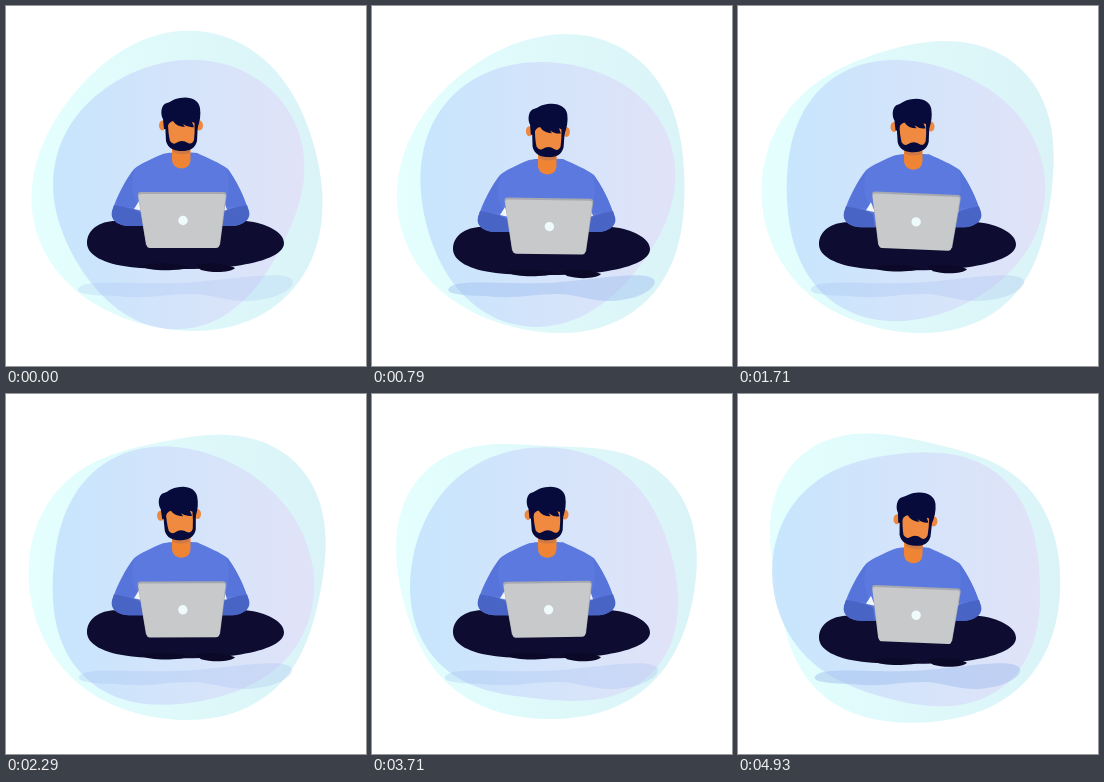
Animation, 360 px wide and 360 px high, one loop 5 s. Source, as an HTML page:

```html
<!DOCTYPE html>
<html lang="en">
<head>
<meta charset="utf-8">
<title>Working on a laptop</title>
<style>
html, body { margin: 0; width: 100%; height: 100%; overflow: hidden; background: #fff; }
svg { display: block; width: 100vw; height: 100vh; }
</style>
</head>
<body>
<svg viewBox="0 0 360 360">
  <defs>
    <linearGradient id="mint">
      <stop offset="0" stop-color="#e4fffe"/>
      <stop offset="1" stop-color="#daf3f7"/>
    </linearGradient>
    <linearGradient id="sky">
      <stop offset="0" stop-color="#c1e0fd"/>
      <stop offset="1" stop-color="#e2dff8"/>
    </linearGradient>
  </defs>
  <path id="outer" fill="url(#mint)"/>
  <path id="inner" fill="url(#sky)" opacity=".82"/>
  <path id="shadow" fill="#9dbbec" d="M72 283C76 274 110 277 140 277C185 279 220 272 250 270C275 268 288 270 287 277C284 287 262 295 238 295C215 294 205 288 185 288C160 288 150 292 122 291C100 289 70 290 72 283Z"/>

  <g id="body">
    <path fill="#0e0d31" d="M81 237C81 223 95 214 112 215H240C260 217 278 226 278 237C278 249 256 256 230 260C200 264 150 264 124 261C98 258 81 249 81 237Z"/>
    <path fill="#0b0927" d="M135 260C145 256 172 257 183 261C176 265 143 266 135 260ZM189 259C203 256 222 258 229 262C225 267 205 267 195 264Z"/>
    <path fill="#5b79de" d="M157 148C164 146 184 146 191 147C202 152 214 157 222 163C229 173 238 190 243 206C243 214 236 220 226 220H124C112 220 105 214 106 206C110 191 120 173 128 163C134 158 147 152 157 148Z"/>
    <path fill="#5674d9" d="M129 163C123 185 128 190 133 201H110C112 190 120 173 129 163ZM221 163C225 180 222 188 219 201H241C238 190 229 171 221 163Z"/>
    <path fill="#4864c5" d="M108 199C118 201 127 202 135 207L137 220H122C110 219 104 213 106 205ZM241 199C232 201 224 202 216 207L214 220H228C240 218 245 212 243 205Z"/>
    <path fill="#f1f5fc" d="M128 203L133 195L137 205ZM221 204L218 195L214 205Z"/>
    <path fill="#ee8434" d="M166 139H184.500V153C184.500 159 181 162.500 175.500 162.500S166 159 166 153Z"/>
    <g id="head">
      <path fill="#cf7a45" d="M167 142H184V147Q175 150 167 146Z"/>
      <ellipse cx="156.500" cy="119.500" rx="3.500" ry="5" fill="#ec8840"/>
      <ellipse cx="193.500" cy="119.500" rx="3.500" ry="5" fill="#ec8840"/>
      <path fill="#f08a40" d="M161 108H190V134Q187 142 176 142T161 134Z"/>
      <path fill="#060b3c" d="M159 116H162Q162 127 164 135Q167 139 170 137Q176 133 182 137Q186 139 188 134Q189 126 188.500 116H192L191 135C189 143 183 145 176 145S162 143 160 135Z"/>
      <path fill="#060b3c" d="M158 123L157 113C154 108 155 98 161 97C165 96 167 93 174 92C184 90 193 94 194 102C195 109 194 116 191 123L189 117L186 116L188 121Q182 122 177 118L179 121Q171 121 167 115Q162 116 161 123Z"/>
    </g>
    <g id="laptop">
      <path fill="#a7a9b1" d="M135 186H217Q221 186 220.500 190L214 239H140L132 190Q131 186 135 186Z"/>
      <path fill="#c8c9ca" d="M135.500 188H217Q220 188 219.500 191L213.500 239Q213 242 210 242H144Q141 242 140.500 239L132.500 191Q132.500 188 135.500 188Z"/>
      <circle cx="177" cy="214.500" r="4.700" fill="#effafa"/>
    </g>
  </g>
</svg>
<script>
const LOOP = 5000, BOB = 2000, TILT = 3200;
const TAU = 2 * Math.PI;
const { sin, cos } = Math;
const $ = id => document.getElementById(id);
const set = (id, name, value) => $(id).setAttribute(name, value);

// Each wave bends a circle: lobes, height, growth of height, start angle, turn (degrees per loop)
const outer = {
  x: 174.5, y: 179.5, sink: 4, r: 147.3, swell: 0,
  waves: [[2, 2.5, 4.5, 185, 265], [3, 6, 0, 128, 200], [4, 0, -5, 0, 0]]
};
const inner = {
  x: 173, y: 184, sink: 0, r: 128.5, swell: 4,
  waves: [[2, -6.5, 12, 40, 0], [3, 5, 0, 255, 290], [4, 1, -4, 0, 0]]
};

function blob(b, p) {
  const out = sin(p * TAU / 4), points = [];
  for (let deg = 0; deg < 360; deg += 3) {
    const a = deg * TAU / 360;
    let r = b.r + b.swell * out;
    for (const [lobes, height, growth, angle, turn] of b.waves)
      r += (height + growth * out) * cos(lobes * a - (angle + turn * p) * TAU / 360);
    points.push(`${(b.x + r * cos(a)).toFixed(2)} ${(b.y + b.sink * p + r * sin(a)).toFixed(2)}`);
  }
  return `M${points.join("L")}Z`;
}

function draw(t) {
  const p = t / LOOP, a = TAU * t / BOB;
  const drop = (1 - cos(a)) / 2;
  const nod = 2 * (cos(2 * a) - cos(a)) - 1.3 * sin(a);
  const tilt = -2.8 * Math.min(1, t / 800) * cos(TAU * (t + 150) / TILT);
  set("outer", "d", blob(outer, p));
  set("inner", "d", blob(inner, p));
  set("body", "transform", `translate(0 ${6.8 * drop})`);
  set("head", "transform", `rotate(${nod} 175 160)`);
  set("laptop", "transform", `rotate(${tilt} 177 242)`);
  set("shadow", "transform", `translate(179 0) scale(${1 - 0.045 * drop} 1) translate(-179 0)`);
  set("shadow", "opacity", 0.23 + 0.24 * drop);
}

const start = performance.now();
function tick() {
  draw((performance.now() - start) % LOOP);
  requestAnimationFrame(tick);
}
tick();
</script>
</body>
</html>
```
